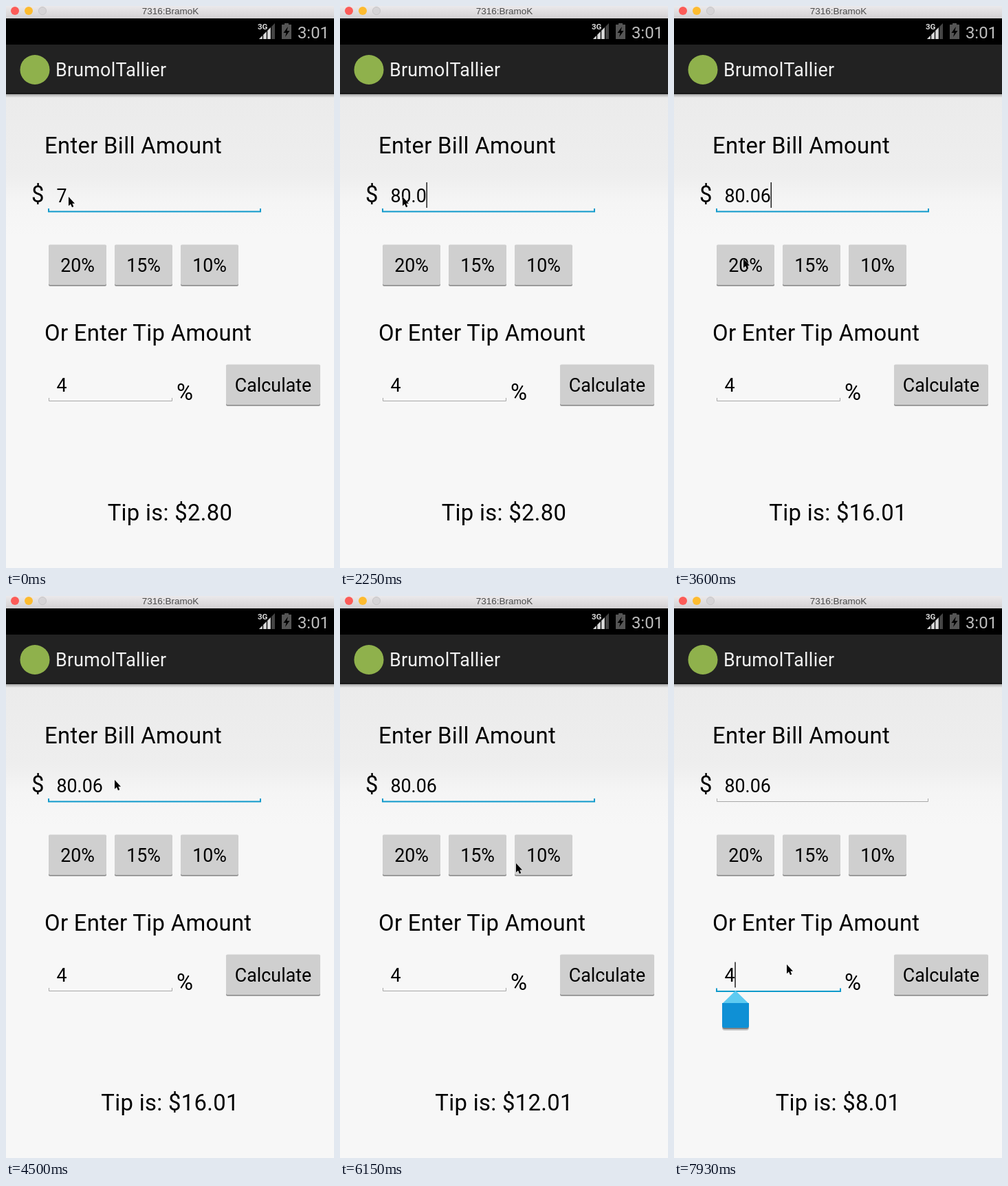
These frames come from a looping animation (477x816 px, 8 s). An HTML page:

```html
<!DOCTYPE html>
<html lang="en">
<head>
<meta charset="utf-8">
<title>Tip form</title>
<style>
  html, body { margin: 0; width: 100%; height: 100%; overflow: hidden; background: #f7f7f7; }
  svg { display: block; width: 477px; height: 816px; }
  text { font-family: Roboto, sans-serif; font-size: 26.8px; fill: #000; }
  .big { font-size: 32.8px; letter-spacing: .01em; }
  .mid { text-anchor: middle; }
  .bar { fill: #f1f1f1; letter-spacing: .01em; }
  .clock { font-size: 23.9px; fill: #bdbdbd; text-anchor: end; }
  .net { font-size: 11.5px; font-weight: 700; fill: #ddd; }
  .win { font: 13.5px "Liberation Sans", sans-serif; fill: #4a4a4a; }
</style>
</head>
<body>
<svg viewBox="0 0 477 816">
  <defs>
    <linearGradient id="chrome" x2="0" y2="1">
      <stop stop-color="#ebe9eb"/><stop offset="1" stop-color="#d3d1d3"/>
    </linearGradient>
    <linearGradient id="page" gradientUnits="userSpaceOnUse" x1="0" y1="128" x2="0" y2="816">
      <stop stop-color="#ebebeb"/><stop offset=".17" stop-color="#eeeeee"/>
      <stop offset=".23" stop-color="#f5f5f5"/><stop offset=".3" stop-color="#f7f7f7"/>
    </linearGradient>
    <linearGradient id="shade" x2="0" y2="1">
      <stop stop-color="#000" stop-opacity=".3"/><stop offset="1" stop-color="#000" stop-opacity="0"/>
    </linearGradient>
  </defs>

  <rect y="128" width="477" height="688" fill="url(#page)"/>
  <rect y="128" width="477" height="5" fill="url(#shade)"/>

  <rect width="477" height="18" fill="url(#chrome)"/>
  <circle cx="13" cy="7" r="6" fill="#fc5b57"/>
  <circle cx="33" cy="7" r="6" fill="#fdbb2f"/>
  <circle cx="53" cy="7" r="5.6" fill="#d6d4d6" stroke="#c2c0c2" stroke-width=".8"/>
  <text class="win mid" x="239" y="12">7316:BramoK</text>

  <rect y="18" width="477" height="38" fill="#000"/>
  <path d="M391 25V48H368Z" fill="#444"/>
  <path d="M385 31V48H368Z" fill="#d8d8d8"/>
  <path d="M373.5 38V48M379.5 32V48M385.5 25V48" stroke="#000" stroke-width="1.3"/>
  <text class="net" x="366" y="34">3G</text>
  <path d="M405 25H411V27H415V48H401V27H405Z" fill="#555"/>
  <path d="M410 30L403.5 39H407.5L406 45L412.5 36H408.5Z" fill="#000"/>
  <text class="clock" x="470" y="46.5">3:01</text>

  <rect y="56" width="477" height="72" fill="#222"/>
  <rect y="126" width="477" height="2" fill="#181818"/>
  <circle cx="42" cy="92.5" r="21.5" fill="#8fb14c"/>
  <text class="bar" x="72" y="102">BrumolTallier</text>

  <text class="big" x="56" y="214">Enter Bill Amount</text>
  <text class="big" x="37" y="285">$</text>
  <text class="big" x="56" y="486">Or Enter Tip Amount</text>
  <text class="big" x="248" y="571.5">%</text>
  <text class="big mid" id="result" x="238.5" y="746.5"></text>

  <path id="billLine" fill="none"/>
  <path id="tipLine" fill="none"/>
  <text id="bill" x="73.5" y="285"></text>
  <text x="73.5" y="560">4</text>

  <g id="buttons"></g>

  <rect id="caret" width="1.3" height="37"/>
  <g id="handle">
    <rect x="70" y="595" width="39" height="36" rx="4" fill="#000" opacity=".18"/>
    <rect x="70.5" y="595" width="38" height="34" rx="3" fill="#000" opacity=".35"/>
    <path d="M89.5 573L109 592H70Z" fill="#5ecbf1"/>
    <path d="M70 591H109V624Q109 627 106 627H73Q70 627 70 624Z" fill="#0f90d5"/>
  </g>
  <path id="pointer" d="M0 0V13.2L3 10.5L5 15.2L7.3 14.2L5.3 9.7H9Z"
        fill="#000" stroke="#fff" stroke-width=".8" stroke-opacity=".75" paint-order="stroke"/>
</svg>
<script>
const LOOP = 8000;
const $ = id => document.getElementById(id);

const typed = [[0, '7'], [150, ''], [1200, '8'], [1350, '80'], [1950, '80.'], [2250, '80.0'], [2550, '80.06']];
const results = [[0, '$2.80'], [3450, '$16.01'], [5700, '$12.01'], [6450, '$8.01']];
const pressed = [[0, ''], [3300, '20%'], [3450, ''], [5400, '15%'], [5700, '']];
const caretOn = [[0, 0], [150, 1], [600, 0], [1200, 1], [1800, 0], [1950, 1], [3150, 0], [3600, 1],
  [4200, 0], [4650, 1], [5100, 0], [5700, 1], [6150, 0], [6600, 1], [7200, 0], [7780, 1]];
const moves = [[0, 91, 277], [2850, 93, 302], [3000, 98, 345], [3150, 101, 367],
  [4050, 107, 356], [4200, 141, 300], [4350, 150, 249], [4500, 158, 267], [4650, 160, 292],
  [4800, 164, 330], [4950, 167, 358], [5100, 174, 368], [5250, 177, 373],
  [6000, 205, 381], [6150, 256, 388], [6300, 268, 380],
  [6900, 256, 408], [7050, 217, 468], [7200, 179, 521], [7340, 164, 535]];
const FOCUS_MOVES = 7780, HANDLE_SHOWS = 7930;

// Latest row of a step table at time t.
const at = (rows, t) => rows.findLast(r => r[0] <= t);

function set(el, attrs) {
  for (const k in attrs) el.setAttribute(k, attrs[k]);
  return el;
}

function add(parent, tag, attrs) {
  return parent.appendChild(set(document.createElementNS('http://www.w3.org/2000/svg', tag), attrs));
}

function button(label, x, y, w) {
  const g = $('buttons');
  add(g, 'rect', { x, y: y + 1.2, width: w, height: 59, rx: 2, fill: '#8f8f8f' });
  const face = add(g, 'rect', { x, y, width: w, height: 58.5, rx: 2 });
  add(g, 'text', { class: 'mid', x: x + w / 2, y: y + 39.7 }).textContent = label;
  return { label, face };
}

const buttons = [
  button('20%', 62, 346.5, 84),
  button('15%', 158, 346.5, 84),
  button('10%', 254, 346.5, 84),
  button('Calculate', 320, 520.5, 137)
];

function underline(el, right, y, focused) {
  const grow = focused ? 0 : .5;
  set(el, {
    d: `M${62 + grow} ${y - 4.5}V${y}H${right - grow}V${y - 4.5}`,
    stroke: focused ? '#0f9acb' : '#a8a8a8',
    'stroke-width': focused ? 2 : 1
  });
}

const advance = s => [...s].reduce((w, c) => w + (c === '.' ? 7.05 : 15.06), 0);
const show = (el, on) => { el.style.display = on ? '' : 'none'; };

function draw(t) {
  const amount = at(typed, t)[1], down = at(pressed, t)[1];
  const [, x, y] = at(moves, t);
  const onTip = t >= FOCUS_MOVES;

  $('bill').textContent = amount;
  $('result').textContent = 'Tip is: ' + at(results, t)[1];
  for (const b of buttons) b.face.setAttribute('fill', b.label === down ? '#b9b9b9' : '#cfcfcf');

  underline($('billLine'), 370, 298.5, !onTip);
  underline($('tipLine'), 242, onTip ? 574 : 573.5, onTip);

  set($('caret'), { x: 73.5 + advance(onTip ? '4' : amount) - .2, y: onTip ? 531.5 : 256 });
  show($('caret'), at(caretOn, t)[1]);
  show($('handle'), t >= HANDLE_SHOWS);
  $('pointer').setAttribute('transform', `translate(${x} ${y})`);
}

const start = performance.now();
function tick() {
  draw((performance.now() - start) % LOOP);
  requestAnimationFrame(tick);
}
tick();
</script>
</body>
</html>
```
